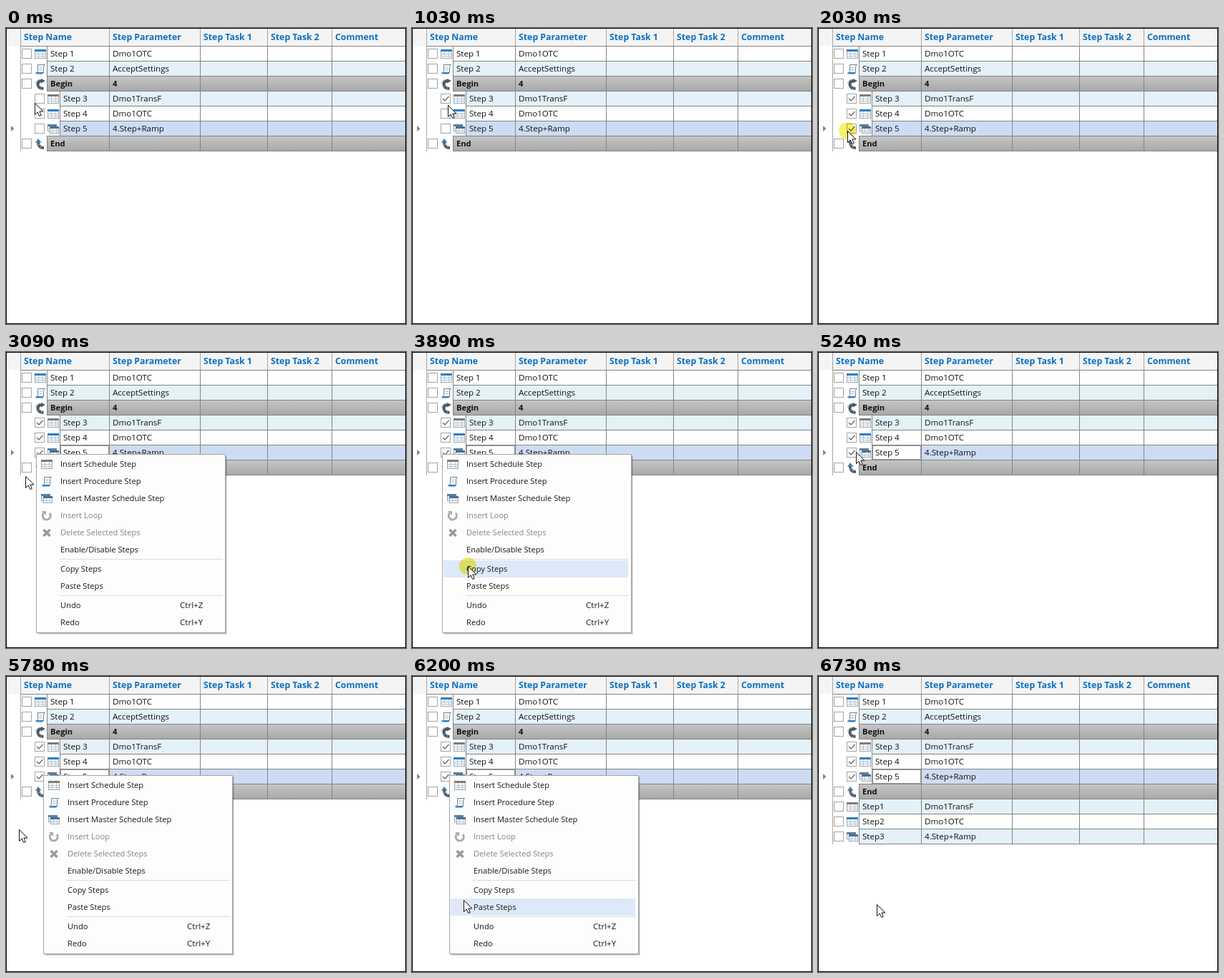
Recreate the animation shown at these times as an HTML page with a canvas. Size 559 px wide and 415 px high, loop 7.65 s.

```html
<!DOCTYPE html>
<html lang="en">
<head>
<meta charset="utf-8">
<title>Step table</title>
<style>
html, body { margin: 0; width: 100%; height: 100%; overflow: hidden; background: #fff; }
canvas { display: block; }
</style>
</head>
<body>
<canvas id="stage" width="559" height="415"></canvas>
<script>
const c = document.getElementById('stage').getContext('2d');
const LOOP = 7650, FAMILY = '"Open Sans", "Noto Sans", sans-serif';
const GRID = '#838383', BLUE = '#2b7fc3', GREY = '#7c7c7c';
const columns = [[20, 'Step Name'], [144, 'Step Parameter'], [271, 'Step Task 1'],
  [365, 'Step Task 2'], [455, 'Comment']];

// name, parameter, icon, indent, time the box is ticked
const rows = [
  ['Step 1', 'Dmo1OTC', 'blue', 0],
  ['Step 2', 'AcceptSettings', 'scroll', 0],
  ['Begin', '4', 'begin', 0],
  ['Step 3', 'Dmo1TransF', 'grey', 18, 690],
  ['Step 4', 'Dmo1OTC', 'blue', 18, 1360],
  ['Step 5', '4.Step+Ramp', 'stack', 18, 2030],
  ['End', '', 'end', 0],
  ['Step1', 'Dmo1TransF', 'grey', 0],
  ['Step2', 'Dmo1OTC', 'blue', 0],
  ['Step3', '4.Step+Ramp', 'stack', 0]
];
const SELECTED = 5, FOCUS = 2430, PASTE = 6730;

// centre y, label, icon, disabled, shortcut
const items = [
  [14, 'Insert Schedule Step', 'grey'],
  [38, 'Insert Procedure Step', 'scroll'],
  [62, 'Insert Master Schedule Step', 'stack'],
  [86, 'Insert Loop', 'loop', true],
  [110, 'Delete Selected Steps', 'cross', true],
  [134, 'Enable/Disable Steps'],
  [161, 'Copy Steps'],
  [185, 'Paste Steps'],
  [212, 'Undo', '', false, 'Ctrl+Z'],
  [236, 'Redo', '', false, 'Ctrl+Y']
];
const menus = [[2430, 4030, 42, 143], [5310, PASTE, 52, 139]];
const clicks = [[690, 830], [1360, 1500], [2030, 2230], [2430, 2620],
  [3890, 4030], [5120, 5240], [6600, PASTE]];

// first step, last step, step count, evenly timed points
const moves = [
  [0, 0, 1, [40, 105]],
  [70, 280, 4, [43, 104], [50, 101]],
  [960, 1220, 5, [50, 104], [50, 121]],
  [1500, 1630, 3, [48, 128], [41, 144]],
  [2090, 2090, 1, [42, 144]],
  [3090, 3760, 11, [27, 174], [22, 205], [40, 250], [78, 300]],
  [4030, 4780, 12, [76, 290], [66, 240], [56, 180], [51, 143]],
  [4850, 4980, 3, [51, 141], [53, 140]],
  [5510, 6260, 12, [45, 149], [12, 230], [45, 298], [82, 320]],
  [6400, 6400, 1, [82, 320]]
];

const active = (spans, t) => spans.find(s => t >= s[0] && t < s[1]);

function pointer(t) {
  const [first, last, n, ...pts] = moves.filter(m => m[0] <= t).pop();
  if (n === 1) return pts[0];
  const k = Math.min(n - 1, Math.floor((t - first) / (last - first) * (n - 1)));
  const u = k / (n - 1) * (pts.length - 1);
  const i = Math.min(pts.length - 2, Math.floor(u));
  return [0, 1].map(a => Math.round(pts[i][a] + (pts[i + 1][a] - pts[i][a]) * (u - i)));
}

function box(x, y, w, h, fill) {
  c.fillStyle = fill;
  c.fillRect(x, y, w, h);
}
function frame(x, y, w, h, edge, fill) {
  box(x, y, w, h, edge);
  box(x + 1, y + 1, w - 2, h - 2, fill);
}
function text(s, x, y, size, color, weight = 400) {
  c.font = `${weight} ${size}px ${FAMILY}`;
  c.fillStyle = color;
  c.fillText(s, x, y);
}
function shape(d, fill, stroke, width = 1) {
  const p = new Path2D(d);
  if (fill) { c.fillStyle = fill; c.fill(p); }
  if (stroke) { c.strokeStyle = stroke; c.lineWidth = width; c.stroke(p); }
}

function table(x, y, w, h, head) {
  frame(x, y, w, h, '#93a3b0', '#fff');
  for (let i = 1; i < 3; i++) box(x + Math.round(i * w / 3), y, 1, h, '#b5c3cd');
  for (let j = 6; j < h - 1; j += 3) box(x, y + j, w, 1, '#b5c3cd');
  box(x, y, w, 3, head);
}
const icons = {
  blue: () => table(0, 1, 16, 13, BLUE),
  grey: () => table(0, 1, 16, 13, GREY),
  stack() {
    table(0, 1, 13, 10, '#5d7e9c');
    table(3, 4, 13, 10, '#4a6f95');
  },
  scroll() {
    shape('M4.5 1.5H14.5Q12 3 12.5 6V12.5H3Q5 11 4.5 8Z', '#f4f9fd', '#75838f');
    shape('M1 12.5Q1 14.5 3 14.5H11Q12.5 14 12.5 12Z', BLUE);
    shape('M6.5 5.5H10.5M6.5 8.5H10.5', null, '#a9bccb');
  },
  begin() {
    shape('M12.5 14Q4.5 13.5 4.5 8Q4.5 3.5 10 3', null, '#50585e', 4);
    shape('M9 0L15 3L9 6.5Z', '#50585e');
    shape('M5 11.5L7 9.5M9 14L10 12', null, '#a4b7c4');
    shape('M1.5 7Q2 2 8 1', null, '#65a8d6');
  },
  end() {
    shape('M13 13Q5 13 5 5', null, '#565d62', 4);
    shape('M1 6L5 0L9.5 5.5Z', '#3f7faa');
    shape('M5 9L7.5 8M8 12.5L9.5 10.5', null, '#b2bdc5');
  },
  loop() {
    shape('M4 3.5A5.5 5.5 0 1 0 12 4', null, '#aaa', 3);
    shape('M1 1H7V7Z', '#aaa');
  },
  cross: () => shape('M3.5 3L12.5 12M12.5 3L3.5 12', null, '#999', 3.5)
};
function icon(name, x, y) {
  if (!name) return;
  c.save();
  c.translate(x, y);
  icons[name]();
  c.restore();
}

function drawRow(row, i, t) {
  const [name, param, pic, indent, tick] = row;
  const y = 25 + 21 * i, x = 57 + indent, mid = y + 11;
  const loop = pic === 'begin' || pic === 'end';
  let fill = i % 2 ? '#e4f1f9' : '#fff';
  if (i === SELECTED) fill = '#cedcf3';
  if (loop) {
    fill = c.createLinearGradient(0, y, 0, y + 21);
    fill.addColorStop(0, '#c6c6c6');
    fill.addColorStop(1, '#a9a9a9');
  }
  box(x, y + 1, 558 - x, 20, fill);
  box(x, y, 558 - x, 1, GRID);
  box(x, y + 21, 558 - x, 1, GRID);
  for (const lx of [x, 144, 271, 365, 455]) box(lx, y, 1, 22, GRID);
  if (i === SELECTED && t >= FOCUS) {
    box(x + 1, y + 1, 143 - x, 20, '#fff');
    c.setLineDash([1, 1]);
    shape(`M${x + 1} ${y + 1.5}H143.5V${y + 20.5}H${x + 1.5}V${y + 1}`, null, '#333');
    c.setLineDash([]);
  }
  frame(22 + indent, mid - 7, 14, 14, '#a3a3a3', '#fff');
  if (t >= tick) shape(`M${25 + indent} ${mid}l3 3l5.5 -6`, null, '#6a6a6a', 1.4);
  icon(pic, 40 + indent, mid - 7);
  const size = loop ? 11.2 : 11.6, weight = loop ? 700 : 400;
  text(name, x + 5, mid + 4, size, '#111', weight);
  text(param, 149, mid + 4, size, '#111', weight);
}

function drawTable(t) {
  box(1, 1, 557, 24, '#f4f4f4');
  box(20, 25, 538, 1, GRID);
  const shown = t < PASTE ? rows.slice(0, 7) : rows;
  shown.forEach((row, i) => drawRow(row, i, t));
  box(20, 1, 1, 25 + 21 * shown.length, '#a5a5a5');
  for (const [x, label] of columns) {
    box(x, 1, 1, 24, '#a5a5a5');
    text(label, x + 5, 17, 12.3, '#0c70c0', 700);
  }
  shape('M7 137L11.5 141L7 145Z', '#858585');
}

function drawMenu([start, , x, y], t, [px, py]) {
  c.save();
  c.beginPath();
  // the first menu opens from its top left corner
  if (start === FOCUS && t < 2620) c.rect(x, y, 135, 31);
  else c.rect(x, y, 267, 253);
  c.clip();
  c.translate(x, y);
  box(3, 3, 264, 250, 'rgba(0,0,0,.12)');
  box(2, 2, 264, 250, 'rgba(0,0,0,.2)');
  frame(0, 0, 265, 251, '#a5a5a5', '#fdfdfd');
  for (const sy of [147, 198]) box(33, sy, 228, 1, '#dcdcdc');
  for (const [mid, label, pic, off, keys] of items) {
    const over = px > x + 2 && px < x + 260 && py >= y + mid - 12 && py < y + mid + 12;
    if (over && !off) box(2, mid - 12, 258, 24, '#dde9f9');
    icon(pic, 7, mid - 7);
    text(label, 34, mid + 4, 11.15, off ? '#858585' : '#1a1a1a');
    if (keys) text(keys, 201, mid + 4, 11.6, '#1a1a1a');
  }
  c.restore();
}

function drawPointer(x, y, pressed) {
  if (pressed) {
    c.globalCompositeOperation = 'multiply';
    c.fillStyle = '#f8f268';
    c.beginPath();
    c.arc(x, y, 12, 0, 7);
    c.fill();
    c.globalCompositeOperation = 'source-over';
  }
  c.save();
  c.translate(x + .5, y + .5);
  shape('M0 0V16L3.7 12.5L6.2 18L8.8 17L6.4 11.5H11.5Z', '#fff', '#111');
  c.restore();
}

function draw(now) {
  const t = now % LOOP, tip = pointer(t), menu = active(menus, t);
  box(0, 0, 559, 415, '#fff');
  drawTable(t);
  if (menu) drawMenu(menu, t, tip);
  drawPointer(...tip, active(clicks, t));
  c.strokeStyle = '#000';
  c.lineWidth = 1;
  c.strokeRect(.5, .5, 558, 414);
}

const begin = performance.now();
function tick() {
  draw(performance.now() - begin);
  requestAnimationFrame(tick);
}
tick();
</script>
</body>
</html>
```
